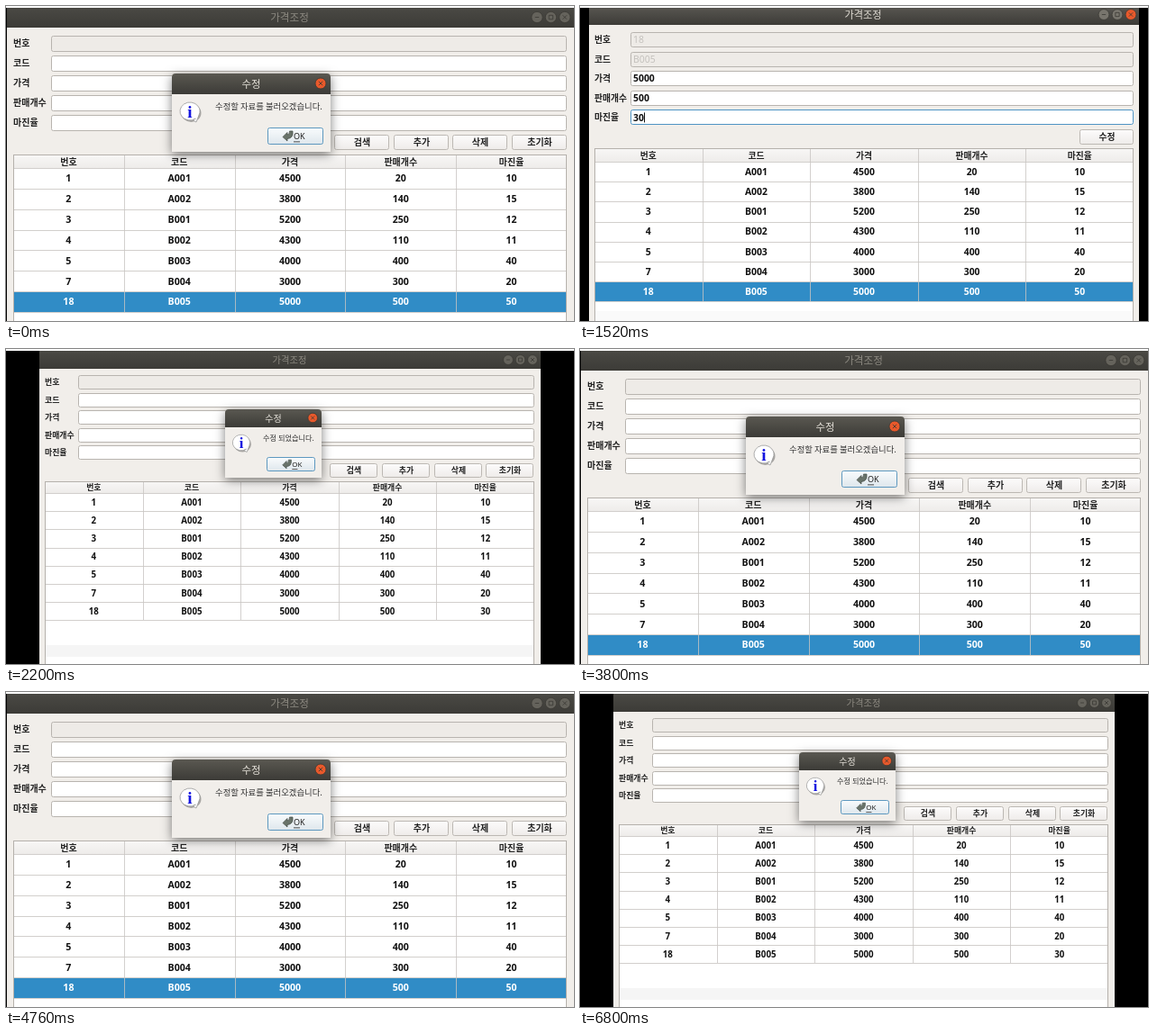
An HTML page with a canvas that plays this animation: 630 by 350 pixels, repeating every 8000 ms.

```html
<!DOCTYPE html>
<html lang="ko">
<head>
<meta charset="utf-8">
<style>
html, body { margin: 0; width: 100%; height: 100%; overflow: hidden; background: #000; }
canvas { display: block; }
</style>
</head>
<body>
<canvas id="stage" width="630" height="350"></canvas>
<script>
const c = document.getElementById('stage').getContext('2d');
const HANGUL = '"Noto Sans CJK KR", "Noto Sans CJK", sans-serif';
const LATIN = '"Noto Sans", "Noto Sans CJK KR", sans-serif';
const LABELS = ['번호', '코드', '가격', '판매개수', '마진율'];
const ROWS = [
  [1, 'A001', 4500, 20, 10], [2, 'A002', 3800, 140, 15], [3, 'B001', 5200, 250, 12],
  [4, 'B002', 4300, 110, 11], [5, 'B003', 4000, 400, 40], [7, 'B004', 3000, 300, 20],
  [18, 'B005', 5000, 500, 50]
];
const ACTIONS = ['검색', '추가', '삭제', '초기화'];

const list = {
  left: 1, right: 630, barEnd: 24, titleY: 12.5, titleX: 314.5, titleSize: 11.6,
  labelX: 8, labelSize: 10, fieldX: 50, edge: 622, fieldY: 41.5, fieldStep: 22, fieldH: 18,
  locked: 1, values: [], controlX: 589, controlStep: 15.4, controlY: 12.5,
  buttons: ACTIONS, buttonX: 364, buttonW: 61, buttonStep: 65.6, buttonY: 143, buttonH: 17,
  tableX: 8, headY: 165, rowY: 180, rowH: 22.86, cellSize: 10.6, selected: true, margin: 50,
  dialog: {
    x: 184, y: 75, w: 176, h: 87, bar: 23, text: '수정할 자료를 불러오겠습니다.',
    size: 9.4, textX: 232, textY: 112, iconX: 204, iconY: 117, ok: [290, 135, 62, 19], scale: 1
  }
};
const edit = {
  left: 10, right: 620, barEnd: 21, titleY: 10, titleX: 314, titleSize: 11.2,
  labelX: 16, labelSize: 9.8, fieldX: 56, edge: 614, fieldY: 37.5, fieldStep: 21.6, fieldH: 17,
  locked: 2, values: ['18', 'B005', '5000', '500', '30'], active: true,
  controlX: 581, controlStep: 15, controlY: 9.5,
  buttons: ['수정'], buttonX: 554, buttonW: 60, buttonStep: 0, buttonY: 137, buttonH: 17,
  tableX: 16, headY: 158, rowY: 173, rowH: 22.2, cellSize: 10.4, selected: true, margin: 50
};
const done = {
  left: 37, right: 593, barEnd: 22, titleY: 12, titleX: 314.5, titleSize: 10.3,
  labelX: 43, labelSize: 8.9, fieldX: 80, edge: 586, fieldY: 37, fieldStep: 19.5, fieldH: 16,
  locked: 1, values: [], controlX: 557, controlStep: 13.5, controlY: 12,
  buttons: ACTIONS, buttonX: 359, buttonW: 53, buttonStep: 57.8, buttonY: 127, buttonH: 16,
  tableX: 43, headY: 147, rowY: 160, rowH: 20.2, cellSize: 9.7, margin: 30,
  dialog: {
    x: 243, y: 67, w: 107, h: 76, bar: 20, text: '수정 되었습니다.',
    size: 8.2, textX: 285, textY: 99.5, iconX: 261, iconY: 104, ok: [289, 120, 54, 16], scale: 0.88
  }
};

function rect(x, y, w, h, fill) {
  c.fillStyle = fill;
  c.fillRect(x, y, w, h);
}
function box(x, y, w, h, r, fill, stroke) {
  c.beginPath();
  c.roundRect(x, y, w, h, r);
  c.fillStyle = fill;
  c.fill();
  if (!stroke) return;
  c.strokeStyle = stroke;
  c.lineWidth = 1;
  c.stroke();
}
function shade(y, h, ...colors) {
  const g = c.createLinearGradient(0, y, 0, y + h);
  colors.forEach((color, i) => g.addColorStop(i / (colors.length - 1), color));
  return g;
}
// Places text with its capital height centred on y.
function text(s, x, y, size, color, { bold = 400, align = 'center', font = HANGUL } = {}) {
  c.font = `${bold} ${size}px ${font}`;
  c.fillStyle = color;
  c.textAlign = align;
  c.textBaseline = 'alphabetic';
  c.fillText(s, x, y + size * 0.36);
}

function control(x, y, r, kind, lit) {
  const close = kind === 2;
  c.beginPath();
  c.arc(x, y, r, 0, 7);
  c.fillStyle = lit ? (close ? '#e9592b' : '#78756d') : '#65635c';
  c.fill();
  c.strokeStyle = '#3a3934';
  c.lineWidth = 0.8;
  c.stroke();
  const d = r * 0.36;
  c.beginPath();
  if (close) {
    c.moveTo(x - d, y - d); c.lineTo(x + d, y + d);
    c.moveTo(x + d, y - d); c.lineTo(x - d, y + d);
  } else if (kind) c.rect(x - d, y - d, 2 * d, 2 * d);
  else { c.moveTo(x - d, y); c.lineTo(x + d, y); }
  c.stroke();
}

function form(s) {
  LABELS.forEach((label, i) => {
    const y = s.fieldY + i * s.fieldStep, locked = i < s.locked;
    const top = Math.round(y - s.fieldH / 2) + 0.5;
    const focus = s.active && i === 4;
    text(label, s.labelX, y, s.labelSize, '#222', { bold: 700, align: 'left' });
    box(s.fieldX + 0.5, top, s.edge - s.fieldX - 1, s.fieldH - 1, 2,
      locked ? '#eeebe7' : '#fff', focus ? '#4f94c4' : '#b8b4af');
    if (!s.values[i]) return;
    text(s.values[i], s.fieldX + 3, y, s.cellSize, locked ? '#c4c1bd' : '#111',
      { bold: locked ? 400 : 600, align: 'left', font: LATIN });
    if (focus) rect(71, y - 5.5, 1, 11, '#111');
  });
  s.buttons.forEach((label, i) => {
    const x = Math.round(s.buttonX + i * s.buttonStep) + 0.5;
    box(x, s.buttonY + 0.5, s.buttonW - 1, s.buttonH - 1, 2,
      shade(s.buttonY, s.buttonH, '#fdfcfc', '#eeebe9'), '#bcb8b3');
    text(label, x + s.buttonW / 2, s.buttonY + s.buttonH / 2, s.labelSize, '#222', { bold: 700 });
  });
}

function table(s) {
  const { tableX: x, headY, rowY, rowH } = s, w = s.edge - x, col = w / 5;
  const lineAt = i => Math.round(rowY + i * rowH);
  const bottom = lineAt(7);
  rect(x, headY, w, 350 - headY, '#fff');
  rect(x, headY, w, rowY - headY, shade(headY, rowY - headY, '#f8f7f6', '#eeecea'));
  if (!s.selected) rect(x, 329, w, 13, '#f5f5f5');
  else {
    rect(x, bottom + rowH / 2, w, 350, '#fafafa');
    rect(x, lineAt(6) + 1, w, bottom - lineAt(6) - 1, '#308cc6');
  }
  for (let i = 0; i < 8; i++) rect(x, lineAt(i), w, 1, '#d2cfcc');
  for (let i = 1; i < 5; i++) {
    const lx = Math.round(x + i * col);
    rect(lx, headY, 1, bottom - headY, 'rgba(200,197,194,.8)');
  }
  rect(x, headY, w, 1, '#b5b1ac');
  rect(x, headY, 1, 350 - headY, '#b5b1ac');
  rect(s.edge - 1, headY, 1, 350 - headY, '#b5b1ac');

  LABELS.forEach((label, i) =>
    text(label, x + (i + 0.5) * col, (headY + rowY) / 2 + 0.5, s.labelSize, '#222', { bold: 700 }));
  ROWS.forEach((row, r) => row.forEach((value, i) => {
    const last = r === 6;
    text(last && i === 4 ? s.margin : value, x + (i + 0.5) * col, rowY + (r + 0.5) * rowH,
      s.cellSize, last && s.selected ? '#fff' : '#111', { bold: 600, font: LATIN });
  }));
}

function infoIcon(x, y, k) {
  c.save();
  c.translate(x, y);
  c.scale(k, k);
  c.beginPath();
  c.ellipse(1.5, 2, 11, 10, 0, 0, 7);
  c.fillStyle = 'rgba(0,0,0,.3)';
  c.fill();
  c.beginPath();
  c.ellipse(0, 0, 11, 10, 0, 0.95, 6.7);
  c.lineTo(7, 12);
  c.lineTo(3, 9.6);
  c.closePath();
  c.fillStyle = '#fff';
  c.fill();
  c.strokeStyle = '#999';
  c.lineWidth = 0.8;
  c.stroke();
  text('i', 0, 0, 19, '#1414e0', { bold: 700, font: '"Liberation Serif", serif' });
  c.restore();
}

function okButton([x, y, w, h], k) {
  box(x + 0.5, y + 0.5, w - 1, h - 1, 2, shade(y, h, '#fafcfd', '#dde6ec'), '#5d98bf');
  c.save();
  c.translate(x + 23, y + h / 2);
  c.scale(k, k);
  c.beginPath();
  c.moveTo(-6, 1);
  c.lineTo(-1, -4);
  c.lineTo(-1, -1.5);
  c.quadraticCurveTo(2, -2, 1.5, -5.5);
  c.lineTo(5, -5.5);
  c.quadraticCurveTo(6, 2.5, -1, 3);
  c.lineTo(-1, 5.5);
  c.closePath();
  c.fillStyle = '#69736a';
  c.fill();
  c.strokeStyle = '#414a43';
  c.lineWidth = 0.7;
  c.stroke();
  text('OK', 6, 0.5, 9, '#222', { align: 'left', font: LATIN });
  rect(6, 6, 7, 0.8, '#222');
  c.restore();
}

function dialog(d) {
  c.save();
  c.shadowColor = 'rgba(0,0,0,.5)';
  c.shadowBlur = 12;
  c.shadowOffsetY = 3;
  box(d.x, d.y, d.w, d.h, [4, 4, 0, 0], '#f1eeea');
  c.restore();
  box(d.x, d.y, d.w, d.bar, [4, 4, 0, 0], shade(d.y, d.bar, '#5a5851', '#3c3b37'));
  text('수정', d.x + d.w / 2, d.y + d.bar / 2, 11.4 * d.scale, '#e6e2da', { bold: 500 });
  control(d.x + d.w - 10 * d.scale - 1, d.y + d.bar / 2 - 0.5, 6 * d.scale, 2, true);
  infoIcon(d.iconX, d.iconY, d.scale);
  text(d.text, d.textX, d.textY, d.size, '#333', { align: 'left' });
  okButton(d.ok, d.scale);
}

function draw(s) {
  const w = s.right - s.left, lit = !s.dialog;
  rect(0, 0, 630, 350, '#000');
  rect(0, 0, 630, 2, '#fff');
  rect(s.left, 2, w, 348, '#f1eeea');
  rect(s.left, 2, w, s.barEnd - 2, shade(2, s.barEnd - 2, lit ? '#575550' : '#4a4944', '#3c3b37'));
  text('가격조정', s.titleX, s.titleY, s.titleSize, lit ? '#e0dcd4' : '#8c8981', { bold: 500 });
  for (let i = 0; i < 3; i++)
    control(s.controlX + i * s.controlStep, s.controlY, s.titleSize * 0.53, i, lit);
  form(s);
  table(s);
  if (s.dialog) dialog(s.dialog);
}

const SCENES = [[500, list], [2200, edit], [3800, done], [5400, list], [6800, edit], [8000, done]];
function tick() {
  const t = performance.now() % 8000;
  draw(SCENES.find(([end]) => t < end)[1]);
  requestAnimationFrame(tick);
}
tick();
</script>
</body>
</html>
```
